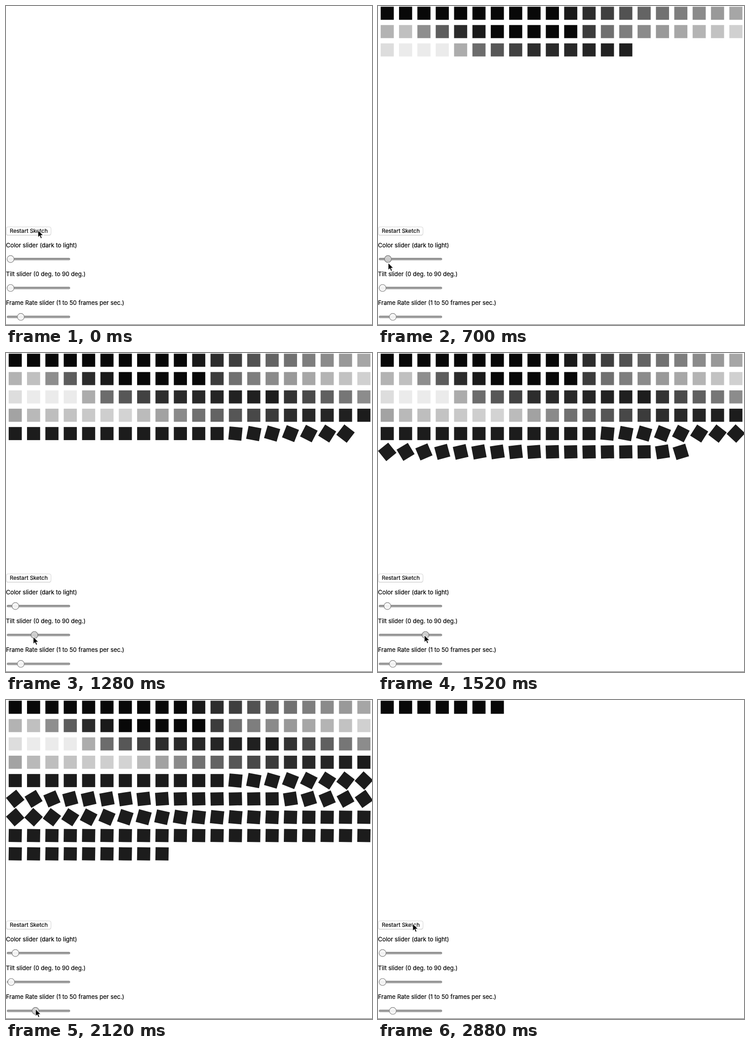
Write an HTML page that moves like this. It is 801 px wide and 699 px high and loops after 2.9 s.

```html
<!DOCTYPE html>
<html lang="en">
<head>
<meta charset="utf-8">
<title>Sketch with sliders</title>
<style>
  html, body { margin: 0; width: 100%; height: 100%; overflow: hidden; background: #fff; }
  svg { display: block; width: 801px; height: 699px; }
  text { font: 12.95px Inter, "Liberation Sans", sans-serif; fill: #000; stroke: #000; stroke-width: .22; }
  .button { font-size: 12.1px; }
  .track { fill: url(#groove); stroke: #707070; stroke-width: .9; }
  .knob { fill: url(#idle); stroke: #7a7a7a; stroke-width: 1.1; }
  .knob.held { fill: url(#held); stroke: #6c6c6c; }
</style>
</head>
<body>
<svg viewBox="0 0 801 699">
  <defs>
    <linearGradient id="groove" x2="0" y2="1">
      <stop stop-color="#848484"/><stop offset="1" stop-color="#c0c0c0"/>
    </linearGradient>
    <linearGradient id="idle" x2="0" y2="1">
      <stop stop-color="#fff"/><stop offset=".5" stop-color="#f0f0f0"/><stop offset="1" stop-color="#fafafa"/>
    </linearGradient>
    <linearGradient id="held" x2="0" y2="1">
      <stop stop-color="#d4d4d4"/><stop offset="1" stop-color="#c6c6c6"/>
    </linearGradient>
  </defs>
  <g id="squares"></g>
  <rect x=".5" y="485" width="98" height="18" rx="4" fill="#d2d2d2"/>
  <rect x=".5" y="484" width="98" height="18" rx="4" fill="#fff" stroke="#d2d2d2"/>
  <text class="button" x="8.3" y="497.4">Restart Sketch</text>
  <text x="0" y="528.6">Color slider (dark to light)</text>
  <text x="0" y="592">Tilt slider (0 deg. to 90 deg.)</text>
  <text x="0" y="655.2">Frame Rate slider (1 to 50 frames per sec.)</text>
  <g id="sliders"></g>
  <rect y="697.6" width="801" height="1.4" fill="#8a8a8a"/>
  <path id="cursor" d="M0 0V16.2L3.7 12.8L6.1 18.4L8.9 17.2L6.5 11.7H11.6Z" fill="#000" stroke="#fff" stroke-width="1.1"/>
</svg>
<script>
const LOOP = 2900, STEP = 20, RESTART = 2787;
const COLS = 20, TOTAL = 240, PITCH = 40.16, SIDE = 28.7;

// Slider drags as [square number, value]
const grey = [
  [9, 8], [14, 100], [21, 192], [24, 43], [26, 8], [30, 8], [32, 112], [41, 235], [43, 235],
  [45, 108], [48, 45], [54, 29], [61, 185], [66, 211], [70, 113], [75, 45], [79, 28]];
const tilt = [
  [91, 0], [99, 43], [103, 75], [109, 88], [114, 89], [116, 73],
  [122, 37], [126, 18], [130, 7], [136, 1]];

// Keyed by time in ms
const frameRate = [[2010, 10], [2180, 30], [2230, 50], [2267, 50], [2350, 6.2], [RESTART - 1, 6.2], [RESTART, 10]];
const pointer = [
  [0, 70, 491], [110, 11, 557], [400, 20, 569], [1020, 22, 556], [1160, 8, 614], [1350, 60, 626],
  [1520, 103, 618], [1820, 10, 612], [1960, 32, 677], [2350, 23, 677], [2400, 21, 532],
  [2700, 70, 490], [RESTART, 76, 490]];

const sliders = [
  { y: 554.5, drag: [110, 1050], grip: 0.5, part: n => (track(grey, n) - 8) / 230 },
  { y: 617.9, drag: [1160, 1800], grip: -2.5, part: n => track(tilt, n) / 90 },
  { y: 681.2, drag: [1960, 2350], grip: 0, part: (n, t) => (track(frameRate, t) - 1) / 49 }];

// Linear interpolation between keys, held at both ends
function track(keys, t, column = 1) {
  const i = keys.findIndex(key => key[0] > t);
  if (i === 0) return keys[0][column];
  if (i < 0) return keys[keys.length - 1][column];
  const a = keys[i - 1], b = keys[i];
  return a[column] + (b[column] - a[column]) * (t - a[0]) / (b[0] - a[0]);
}

function add(parent, name, attrs) {
  const el = document.createElementNS("http://www.w3.org/2000/svg", name);
  for (const key in attrs) el.setAttribute(key, attrs[key]);
  return document.getElementById(parent).appendChild(el);
}

// Squares drawn so far at each millisecond
const drawn = [];
let sum = 0.7;
for (let t = 0; t < LOOP; t++) {
  if (t === RESTART) sum = 0;
  drawn.push(Math.min(sum, TOTAL));
  sum += track(frameRate, t) / 130;
}

const squares = Array.from({ length: TOTAL }, (_, n) => {
  const x = 20.2 + (n % COLS) * PITCH, y = 15.9 + Math.floor(n / COLS) * PITCH;
  const c = Math.round(track(grey, n));
  return add("squares", "rect", {
    x: -SIDE / 2, y: -SIDE / 2, width: SIDE, height: SIDE, fill: `rgb(${c},${c},${c})`,
    transform: `translate(${x} ${y}) rotate(${track(tilt, n)})`
  });
});

for (const s of sliders) {
  add("sliders", "rect", { class: "track", x: 2.4, y: s.y - 2, width: 137.4, height: 4, rx: 1.6 });
  s.knob = add("sliders", "circle", { class: "knob", cy: s.y, r: 7.6 });
}
const cursor = document.getElementById("cursor");

function draw(t) {
  const count = drawn[t];
  squares.forEach((el, n) => el.setAttribute("visibility", n + 1 <= count ? "visible" : "hidden"));

  let x = track(pointer, t);
  for (const { knob, drag, grip, part } of sliders) {
    const place = 10 + 122 * part(count - 1, t);
    const held = t >= drag[0] && t < drag[1];
    knob.setAttribute("cx", place);
    knob.classList.toggle("held", held);
    if (held) x = place + grip;
  }
  cursor.setAttribute("transform", `translate(${x} ${track(pointer, t, 2)})`);
}

const start = performance.now();
function tick() {
  const t = (performance.now() - start) % LOOP;
  draw(Math.floor(t / STEP) * STEP);
  requestAnimationFrame(tick);
}
tick();
</script>
</body>
</html>
```
